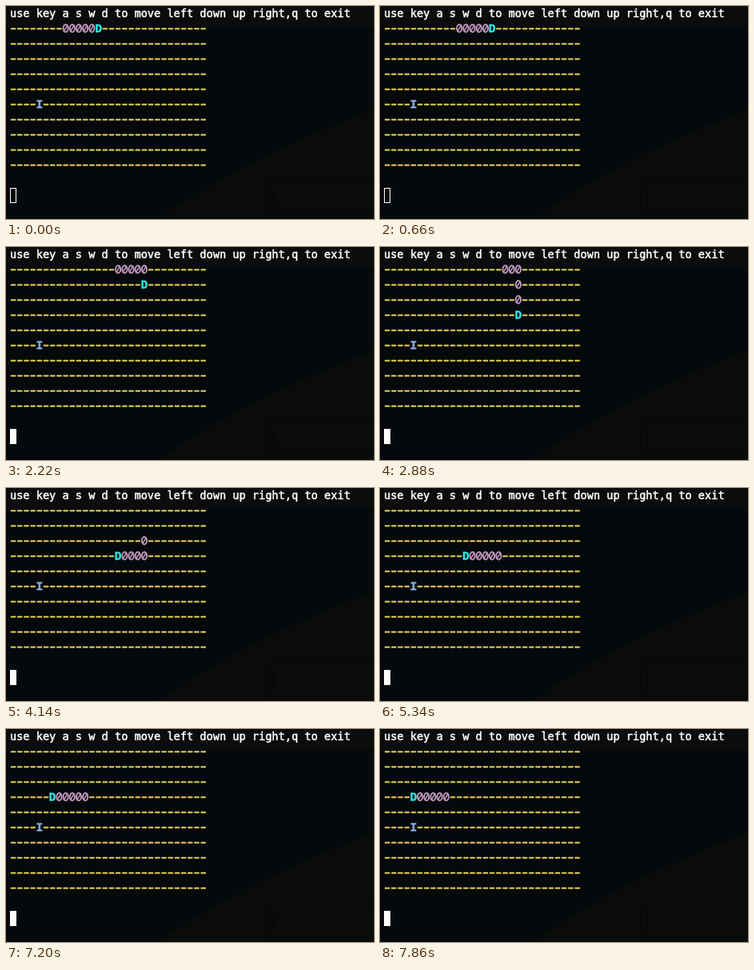
These frames come from a looping animation (460x267 px, 8000 ms). An HTML page with a canvas:

```html
<!DOCTYPE html>
<html lang="en">
<head>
<meta charset="utf-8">
<title>Terminal snake</title>
<style>
html, body { margin: 0; width: 100%; height: 100%; overflow: hidden; background: #05090c; }
canvas { display: block; }
</style>
</head>
<body>
<canvas id="stage" width="460" height="267"></canvas>
<script>
const ctx = document.getElementById('stage').getContext('2d');
const LOOP = 8000, TICK = 311, FIRST = 38, STEP = 60;
const CELL = 8.19, LINE = 19, LEFT = 5, BASE = 33;
const COLS = 30, ROWS = 10, BODY = 5;
const FONT = '"DejaVu Sans Mono", "Noto Sans Mono", monospace';
const FOOD = { col: 4, row: 5 };
const FOCUS = 1740; // the cursor turns solid here

// Cell on the route: right along the top, down three rows, then left.
function cellAt(n) {
  if (n <= 7) return { col: 13 + n, row: 0 };
  if (n <= 10) return { col: 20, row: n - 7 };
  return { col: 30 - n, row: 3 };
}

const cellX = col => LEFT + col * CELL;
const cellY = row => BASE + row * LINE;

// Text with a thin outline of its own colour, for a heavier stem.
function heavyText(text, x, y, size, weight, color) {
  ctx.font = `${weight} ${size}px ${FONT}`;
  ctx.fillStyle = ctx.strokeStyle = color;
  ctx.lineWidth = 0.5;
  ctx.lineJoin = 'round';
  ctx.fillText(text, x, y);
  ctx.strokeText(text, x, y);
}

function letter(text, { col, row }, color) {
  ctx.textAlign = 'center';
  heavyText(text, cellX(col) + CELL / 2, cellY(row) + 0.4, 14.6, 'bold', color);
  ctx.textAlign = 'left';
}

function stroke(x1, y1, x2, y2, width, color) {
  ctx.strokeStyle = color;
  ctx.lineWidth = width;
  ctx.lineCap = 'round';
  ctx.beginPath();
  ctx.moveTo(x1, y1);
  ctx.lineTo(x2, y2);
  ctx.stroke();
}

function dash(col, row) {
  const x = cellX(col), y = cellY(row) - 4.6;
  stroke(x + 1.7, y, x + 6.5, y, 2, '#ebd75a');
}

function slashedZero({ col, row }) {
  const x = cellX(col) + CELL / 2, y = cellY(row) - 5, color = '#c49bc0';
  ctx.strokeStyle = color;
  ctx.lineWidth = 1.9;
  ctx.beginPath();
  ctx.ellipse(x, y, 3.1, 4.7, 0, 0, Math.PI * 2);
  ctx.stroke();
  stroke(x - 2.3, y + 3.8, x + 2.3, y - 3.8, 1.5, color);
}

function backdrop() {
  ctx.fillStyle = '#05090c';
  ctx.fillRect(0, 0, 460, 267);
  ctx.fillStyle = '#0a0c0d';
  ctx.fillRect(0, 0, 460, 26);
  ctx.fillStyle = '#0a0c0b';
  ctx.beginPath();
  ctx.moveTo(190, 267);
  ctx.quadraticCurveTo(300, 190, 460, 130);
  ctx.lineTo(460, 267);
  ctx.fill();
  ctx.strokeStyle = '#060808';
  ctx.lineWidth = 1;
  ctx.strokeRect(326.5, 219.5, 140, 42);
  ctx.fillStyle = '#000';
  ctx.fillRect(334, 232, 1, 17);
}

function cursor(solid) {
  ctx.fillStyle = ctx.strokeStyle = '#fff';
  ctx.lineWidth = 1;
  ctx.lineJoin = 'miter';
  if (solid) ctx.fillRect(5, 228, 8, 19);
  else ctx.strokeRect(5.5, 228.5, 7, 18);
}

function draw(t) {
  const now = Math.floor(t / STEP) * STEP;
  const head = Math.floor((now - FIRST) / TICK) + 1;
  const snake = Array.from({ length: BODY + 1 }, (_, i) => cellAt(head - i));
  const taken = [FOOD, ...snake];

  backdrop();
  heavyText('use key a s w d to move left down up right,q to exit',
    LEFT, BASE - LINE, 13.6, 'normal', '#fff');
  for (let row = 0; row < ROWS; row++) {
    for (let col = 0; col < COLS; col++) {
      if (!taken.some(c => c.col === col && c.row === row)) dash(col, row);
    }
  }
  letter('I', FOOD, '#86a8d8');
  snake.slice(1).forEach(slashedZero);
  letter('D', snake[0], '#2fe0dc');
  cursor(now >= FOCUS);
}

const start = performance.now();
function frame() {
  draw((performance.now() - start) % LOOP);
  requestAnimationFrame(frame);
}
frame();
</script>
</body>
</html>
```
